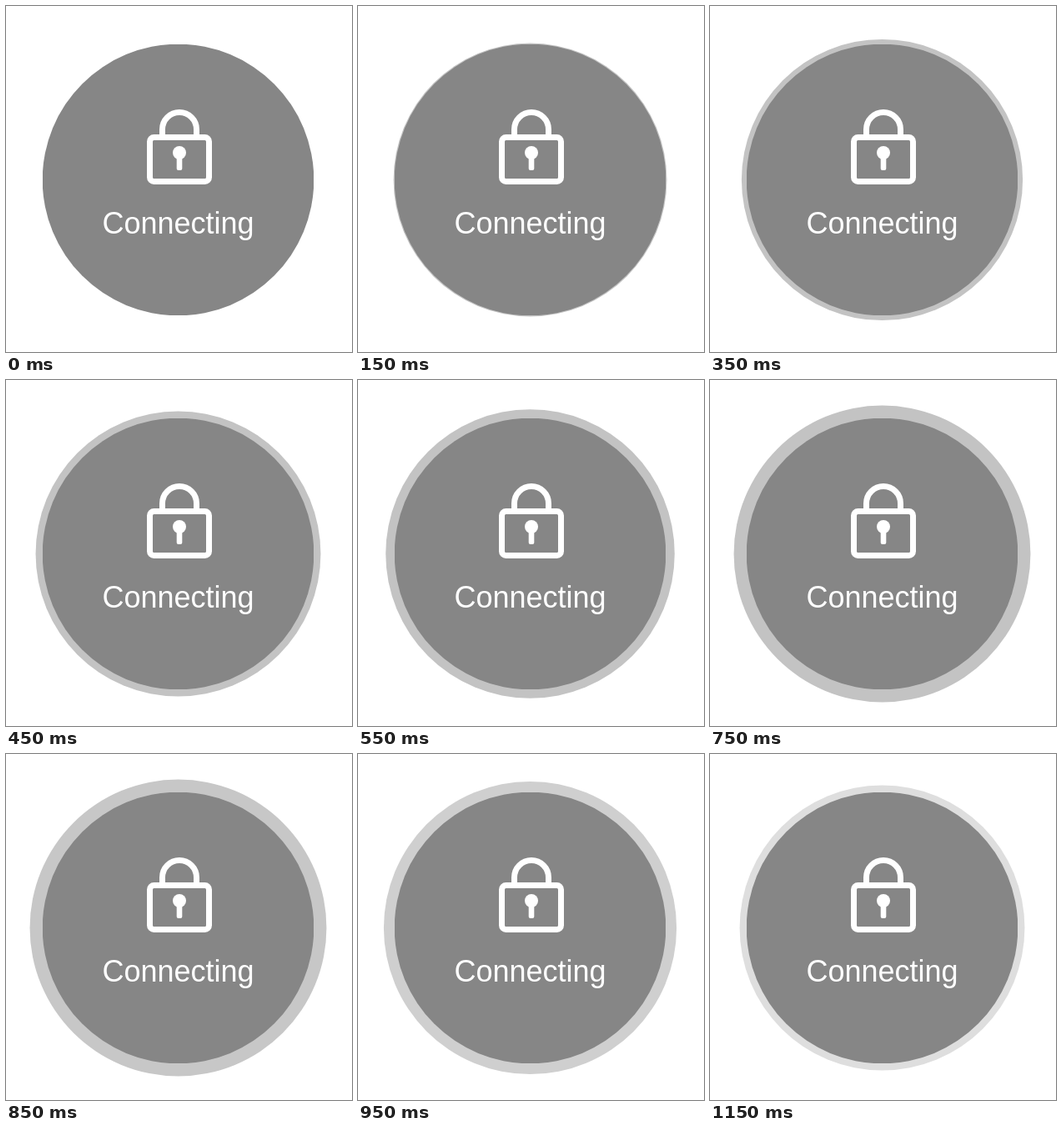
An HTML page that plays this animation: 415x415 px, repeating every 1.2 s.

```html
<!DOCTYPE html>
<html lang="en">
<head>
<meta charset="utf-8">
<title>Connecting</title>
<style>
  html, body { margin: 0; width: 100%; height: 100%; overflow: hidden; background: #fff; }
  svg { display: block; width: 100vw; height: 100vh; }
  text { font: 36px "Liberation Sans", Arial, sans-serif; fill: #fff; text-anchor: middle; }
</style>
</head>
<body>
<svg viewBox="0 0 415 415">
  <clipPath id="box"><rect x="44" y="46" width="325" height="325"/></clipPath>
  <circle id="ring" cx="206.5" cy="208.5" r="0"/>
  <circle cx="206.5" cy="208.5" r="162.8" fill="#868686" clip-path="url(#box)"/>
  <g fill="none" stroke="#fff" stroke-width="7">
    <rect x="172.5" y="157.5" width="71" height="53" rx="5"/>
    <path d="M187.5 157V148a20.5 20.5 0 0 1 41 0V157"/>
  </g>
  <g fill="#fff">
    <circle cx="208" cy="176" r="8"/>
    <rect x="204.7" y="176" width="6.6" height="21" rx="2"/>
  </g>
  <text x="206.5" y="273">Connecting</text>
</svg>
<script>
  const LOOP = 1200, STEP = 50, START = 100, PEAK = 800;
  const ring = document.getElementById("ring");

  // The ring grows at a steady rate, then shrinks at the same rate while fading.
  function draw(now) {
    const t = Math.floor((now % LOOP) / STEP) * STEP;
    const radius = Math.min(178.5, 179.1 - Math.abs(t - PEAK) * 0.0233);
    const grey = Math.round(195 + Math.max(0, t - PEAK) * 0.077);
    ring.setAttribute("r", t < START ? 0 : radius);
    ring.setAttribute("fill", `rgb(${grey},${grey},${grey})`);
  }

  const begin = performance.now();
  function tick() {
    draw(performance.now() - begin);
    requestAnimationFrame(tick);
  }
  tick();
</script>
</body>
</html>
```
